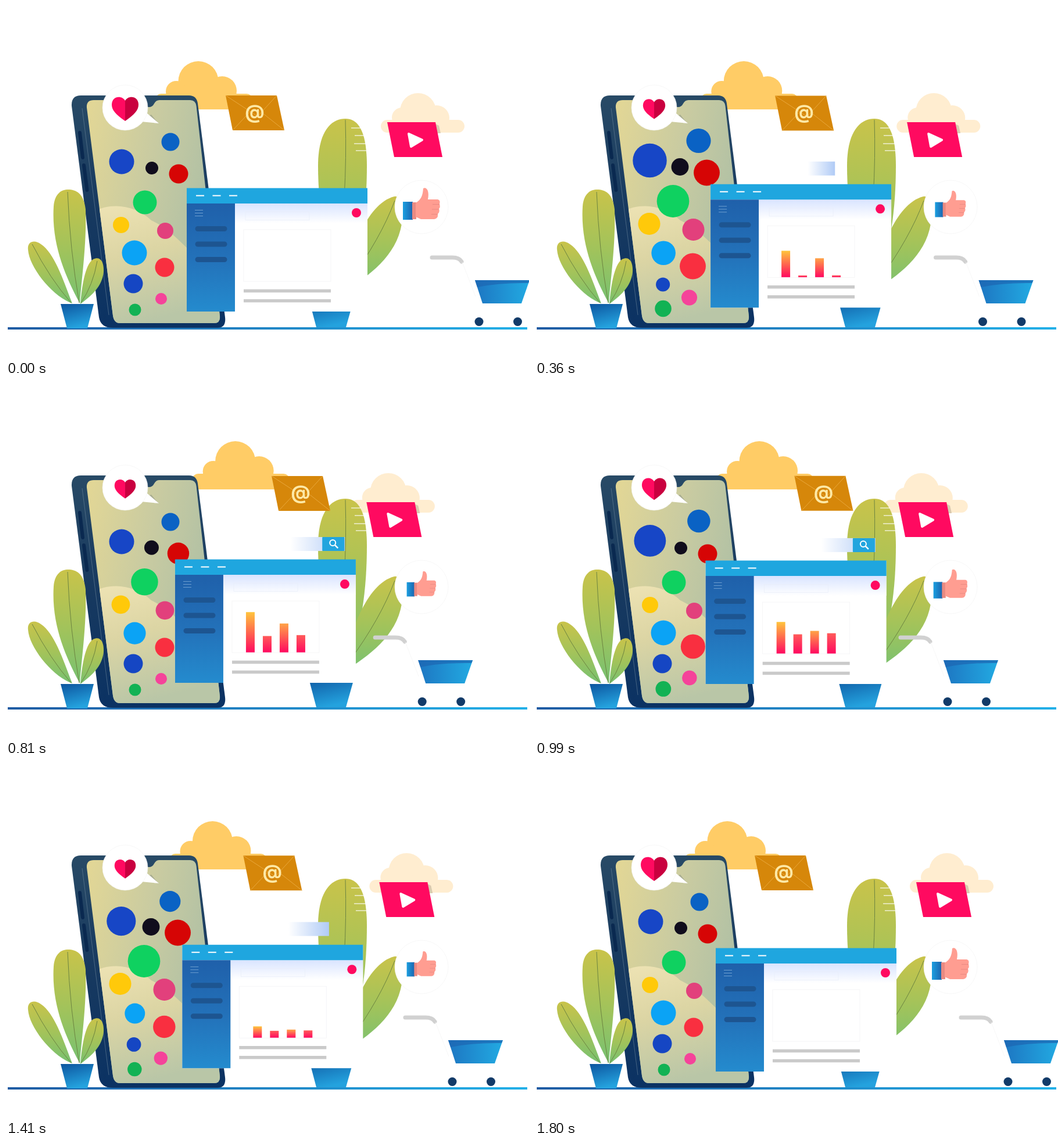
These frames come from a looping animation (900x606 px, 1860 ms). An HTML page:

```html
<!DOCTYPE html>
<html lang="en">
<head>
<meta charset="utf-8">
<title>Social shopping scene</title>
<style>
html, body { margin: 0; height: 100%; overflow: hidden; background: #fff; }
svg { display: block; width: 100%; height: 100%; }
text { font: 700 33px Inter, Arial, sans-serif; }
</style>
</head>
<body>
<svg viewBox="0 0 900 606">
  <defs>
    <linearGradient id="leaf" x2="0" y2="1"><stop stop-color="#c9c34a"/><stop offset=".55" stop-color="#9fc35c"/><stop offset="1" stop-color="#76c172"/></linearGradient>
    <linearGradient id="pot" x2=".35" y2="1"><stop stop-color="#0d559f"/><stop offset="1" stop-color="#24a2de"/></linearGradient>
    <linearGradient id="ground" gradientUnits="userSpaceOnUse" x1="3" x2="897"><stop stop-color="#1f5ba3"/><stop offset="1" stop-color="#22b0e8"/></linearGradient>
    <linearGradient id="body" x2="0" y2="1"><stop stop-color="#284a66"/><stop offset=".5" stop-color="#17395f"/><stop offset="1" stop-color="#0b3263"/></linearGradient>
    <linearGradient id="screen" x2="1" y2=".35"><stop stop-color="#e3d795"/><stop offset=".5" stop-color="#c9cba1"/><stop offset="1" stop-color="#adbfa5"/></linearGradient>
    <linearGradient id="wave" x2=".3" y2="1"><stop stop-color="#eee3b4"/><stop offset=".45" stop-color="#dcd5a4"/><stop offset="1" stop-color="#b9c6a7"/></linearGradient>
    <linearGradient id="side" x2="0" y2="1"><stop stop-color="#1f60aa"/><stop offset=".5" stop-color="#2371b9"/><stop offset="1" stop-color="#248bce"/></linearGradient>
    <linearGradient id="glow" x2="0" y2="1"><stop stop-color="#d9e4ff"/><stop offset="1" stop-color="#fff"/></linearGradient>
    <linearGradient id="fade"><stop offset=".4" stop-color="#fff"/><stop offset="1" stop-color="#b0cbf6"/></linearGradient>
    <linearGradient id="basket"><stop stop-color="#1d76c2"/><stop offset="1" stop-color="#22aae2"/></linearGradient>
    <linearGradient id="cuff"><stop stop-color="#1b9fe0"/><stop offset="1" stop-color="#1c64ae"/></linearGradient>
    <clipPath id="screenClip"><path id="glass" d="M151 162H172V174H246Q252 174 255 168Q258 162 264 162H317Q326 162 327.500 172L368 534Q369 546 358 546H196Q186 546 184 533L139 175Q138 162 151 162Z"/></clipPath>
  </defs>

  <g id="cloudA" fill="#ffcc66">
    <rect x="257" y="151" width="167" height="27" rx="10"/>
    <circle cx="331" cy="129.500" r="34.500"/><circle cx="293" cy="147" r="18"/><circle cx="372" cy="146" r="25"/>
    <path d="M280 140H390V178H280Z"/>
  </g>
  <g id="cloudB" fill="#ffedd0">
    <rect x="645" y="196" width="144" height="22" rx="11"/>
    <circle cx="709" cy="181" r="31"/><circle cx="681" cy="192" r="17"/><circle cx="741" cy="193" r="22"/>
  </g>

  <path d="M583 500C550 430 537 350 537 275C537 215 560 194 584 194C606 194 621 215 621 275C621 350 612 420 583 500Z" fill="url(#leaf)"/>
  <path d="M584 196Q586 260 582 330" fill="none" stroke="#6c8440"/>
  <path d="M594 210H611M600 223H620M599 237H621M602 249H621" stroke="#fff" stroke-opacity=".75" stroke-width="1.500"/>
  <path d="M580 492C588 430 620 340 668 328C680 326 684 340 681 375C672 430 625 465 580 492Z" fill="url(#leaf)"/>
  <path d="M669 335Q645 400 590 475" fill="none" stroke="#6c8440"/>
  <path d="M3 555H897" stroke="url(#ground)" stroke-width="4"/>
  <path d="M520 500H600L585 553H534Z" fill="url(#pot)"/>

  <path d="M129 154H315Q328 154 330 168L377 536Q379 554 364 554H184Q163 554 160 536L113 172Q112 154 129 154Z" fill="url(#body)"/>
  <path d="M131 176L177 532" stroke="#7891a4" opacity=".5"/>
  <path d="M127 218L132 261M134 274L139.500 317" stroke="#0a2950" stroke-width="6" stroke-linecap="round"/>
  <use href="#glass" fill="url(#screen)"/>
  <path d="M150 354C185 336 225 345 250 369C277 381 299 405 313 418L380 490V550H150Z" fill="url(#wave)" clip-path="url(#screenClip)"/>

  <g id="dots"></g>

  <path d="M238 192L262 202L250 187Z" fill="#a8ad91"/>
  <path d="M242 184L263 202L232 199Z" fill="#fff"/>
  <circle cx="205" cy="175" r="39" fill="#fff" stroke="#f1f1f1" stroke-width=".6"/>
  <g id="heart">
    <path d="M205 198C189 187 182 179 182 170C182 155 199 153 205 163Z" fill="#ff0a60"/>
    <path d="M205 198C221 187 228 179 228 170C228 155 211 153 205 163Z" fill="#c9003f"/>
  </g>

  <g fill="url(#leaf)">
    <path d="M127 512C102 465 78 410 82 345C84 322 96 316 107 316C120 316 134 322 137 350C139 410 130 470 127 512Z"/>
    <path d="M114 512C80 500 40 450 38 420C36 404 50 402 60 410C83 425 98 470 114 512Z"/>
    <path d="M128 513C130 490 135 445 150 436C162 430 169 440 168 458C165 485 145 500 128 513Z"/>
  </g>
  <path d="M106 320Q110 420 126 511M45 410Q76 470 112 511M157 439Q150 480 129 511" fill="none" stroke="#6c8440"/>
  <path d="M94 513H151L140 555H105Z" fill="url(#pot)"/>

  <g id="search">
    <rect id="field" x="447" y="274" height="24" fill="url(#fade)"/>
    <g id="button">
      <rect x="564" y="274" width="38" height="24" rx="1" fill="#22a5de"/>
      <path d="M586 288L591 293" stroke="#fff" stroke-width="2.500"/>
      <circle cx="582" cy="284" r="5" fill="none" stroke="#fff" stroke-width="2"/>
    </g>
  </g>

  <g id="panel">
    <path d="M311 314H622V526H311Z" fill="#fff"/>
    <path d="M394 340H622V374H394Z" fill="url(#glow)"/>
    <path d="M311 313.500H622V340H311Z" fill="#1fa6df"/>
    <path d="M327 326.500H341M355.500 326.500H369.500M384 326.500H398" stroke="#fff" stroke-width="2"/>
    <path d="M311 340H394V526H311Z" fill="url(#side)"/>
    <path d="M325 351.500H339M325 356.500H339M325 361.500H339" stroke="#6e9fd0"/>
    <path d="M330 383.500H376M330 410H376M330 436.500H376" stroke="#1d5591" stroke-width="9" stroke-linecap="round"/>
    <circle cx="603" cy="356" r="8" fill="#ff0a60"/>
    <rect x="412" y="354.500" width="110" height="14" fill="none" stroke="#e8edf8" stroke-width=".7"/>
    <rect x="409" y="385" width="150" height="89" fill="none" stroke="#f3f3f5" stroke-width=".8"/>
    <path d="M409 490.500H559M409 507.500H559" stroke="#cacaca" stroke-width="5.500"/>
    <g id="bars"></g>
  </g>

  <g id="mail">
    <path d="M378 154H466L479 214H390Z" fill="#d6870a"/>
    <path d="M378 154L433 190L466 154M390 214L420 182M479 214L441 184" fill="none" stroke="#e9a83d"/>
    <text x="428" y="194" text-anchor="middle" fill="#ffe9a6">@</text>
  </g>
  <g id="video">
    <path d="M739 203L745 206L748 219H742Z" fill="#d9cbb0"/>
    <path d="M656 200H739L751 260H668Z" fill="#ff0a60"/>
    <path d="M693 220L716 230.500L697 242Z" fill="#fff" stroke="#fff" stroke-width="4" stroke-linejoin="round"/>
  </g>

  <circle cx="715" cy="346" r="46" fill="#fff" stroke="#f1f1f1" stroke-width=".6"/>
  <g id="thumb">
    <path d="M683 337H700V368H683Z" fill="url(#cuff)"/>
    <path d="M699 338H706V367H699Z" fill="#e98a82"/>
    <path d="M705 339C715 333 717 326 718 314C724 311 729 319 726 333H743Q748 334 746 341Q748 346 745 349Q747 355 743 358Q744 366 737 367H714L705 363Z" fill="#ff9d91"/>
    <path d="M734 341.500H746M733 350H745M732 358.500H743" stroke="#e98a82"/>
  </g>

  <g id="cart">
    <path d="M733 433H768Q780 433 784 440" fill="none" stroke="#d1d1d1" stroke-width="7" stroke-linecap="round"/>
    <path d="M785 441L808 500" stroke="#f5f5f5" stroke-width=".8"/>
    <path d="M807 472H901L887 512H820Z" fill="url(#basket)"/>
    <path d="M807 472H901L899 477Q850 476 811 484Z" fill="#1c67b3" opacity=".75"/>
    <circle cx="814" cy="543.500" r="7.500" fill="#123a68"/><circle cx="880.500" cy="543.500" r="7.500" fill="#123a68"/>
  </g>
</svg>
<script>
const LOOP = 1860, STEP = 30, LAST = 1800;
const $ = id => document.getElementById(id);

function add(parent, tag, attrs) {
  const el = document.createElementNS("http://www.w3.org/2000/svg", tag);
  for (const name in attrs) el.setAttribute(name, attrs[name]);
  return parent.appendChild(el);
}

// Linear interpolation through [time, value] pairs.
function track(t, keys) {
  let [t0, v0] = keys[0];
  for (const [t1, v1] of keys) {
    if (t < t1) return t <= t0 ? v0 : v0 + (v1 - v0) * (t - t0) / (t1 - t0);
    [t0, v0] = [t1, v1];
  }
  return v0;
}

const slideKeys = [[0, 0], [840, 1], [1745, 0]];
const cartKeys = [[0, 0], [930, 1], [1743, 0]];
const fieldKeys = [[80, 0], [640, 156], [1250, 156], [1420, 114], [1645, 0]];
const buttonKeys = [[640, 0], [760, 1], [1100, 1], [1250, 0]];

const early = [[0, 0], [260, 1], [570, 1], [800, 0], [830, 0], [1040, 1], [1270, 1], [1530, 0]];
const late = [[0, 0], [300, 1], [590, 1], [940, 0], [1010, 0], [1300, 1], [1450, 1], [1750, 0]];
const shrinkA = [[0, 0], [330, 0], [500, -.52], [700, -.52], [970, 0], [1030, 0], [1300, -.52], [1450, -.52], [1700, 0]];
const shrinkB = [[0, 0], [300, -.75], [390, -.75], [720, 0], [1000, 0], [1350, -.75], [1430, -.68], [1700, 0]];

const dots = [
  [283, 234, 15.5, "#0a62c4", early],
  [199, 268, 21.5, "#1746c6", early],
  [251, 279, 11, "#100d1c", late],
  [297, 289, 16.5, "#d60505", late],
  [239, 338, 20.5, "#0fd160", late],
  [198, 377, 14, "#ffc90a", late],
  [274, 387, 14, "#e2407c", late],
  [221, 425, 21.5, "#0ba3f5", shrinkA],
  [273, 450, 16.5, "#f92f40", early],
  [219, 478, 16.5, "#1546c3", shrinkB],
  [267, 504, 10, "#f5439a", early],
  [222, 523, 10.5, "#12b254", early]
].map(([x, y, r, fill, keys]) => ({ x, y, r, keys, el: add($("dots"), "circle", { fill }) }));

const bars = [[83, 645, 15, "#ffc53d"], [35.5, 942, 307, "#ff5b59"], [59.5, 645, 15, "#ffa447"], [37.5, 942, 307, "#ff5b59"]]
  .map(([peak, top, start, color], i) => {
    const grad = add(document.querySelector("defs"), "linearGradient", { id: "bar" + i, x2: 0, y2: 1 });
    add(grad, "stop", { "stop-color": color });
    add(grad, "stop", { offset: 1, "stop-color": "#ff0a60" });
    const el = add($("bars"), "rect", { x: 433 + 29 * i, width: 15, fill: `url(#bar${i})` });
    return { el, keys: [[start, 0], [top, peak], [1645, 0]] };
  });

const move = (id, x, y = 0) => $(id).setAttribute("transform", `translate(${x} ${y})`);
const scale = (id, s, x, y) =>
  $(id).setAttribute("transform", `translate(${x} ${y}) scale(${s}) translate(${-x} ${-y})`);

function draw(t) {
  const p = track(t, slideKeys);
  move("cloudA", 66 * p);
  move("cloudB", -53 * p);
  move("mail", 82 * p, p);
  move("video", -37 * p);
  move("panel", -20.8 * p, -15.5 * p);
  move("search", -20.5 * p, -14.5 * p);
  move("cart", -112.3 * track(t, cartKeys));

  $("field").setAttribute("width", track(t, fieldKeys));
  scale("button", track(t, buttonKeys), 583, 286);

  const beat = .895 + .105 * Math.cos(2 * Math.PI * Math.min(t / 555, 3));
  scale("heart", beat, 205, 177);
  scale("thumb", beat, 715, 341);

  for (const d of dots) {
    const k = track(t, d.keys);
    d.el.setAttribute("cx", d.x - 1.5 * k);
    d.el.setAttribute("cy", d.y - 2 * k);
    d.el.setAttribute("r", d.r * (1 + .36 * k));
  }
  for (const { el, keys } of bars) {
    const h = track(t, keys);
    el.setAttribute("y", 473.5 - h);
    el.setAttribute("height", h);
  }
}

const begin = performance.now();
function tick() {
  const t = (performance.now() - begin) % LOOP;
  draw(Math.min(Math.floor(t / STEP) * STEP, LAST));
  requestAnimationFrame(tick);
}
tick();
</script>
</body>
</html>
```
